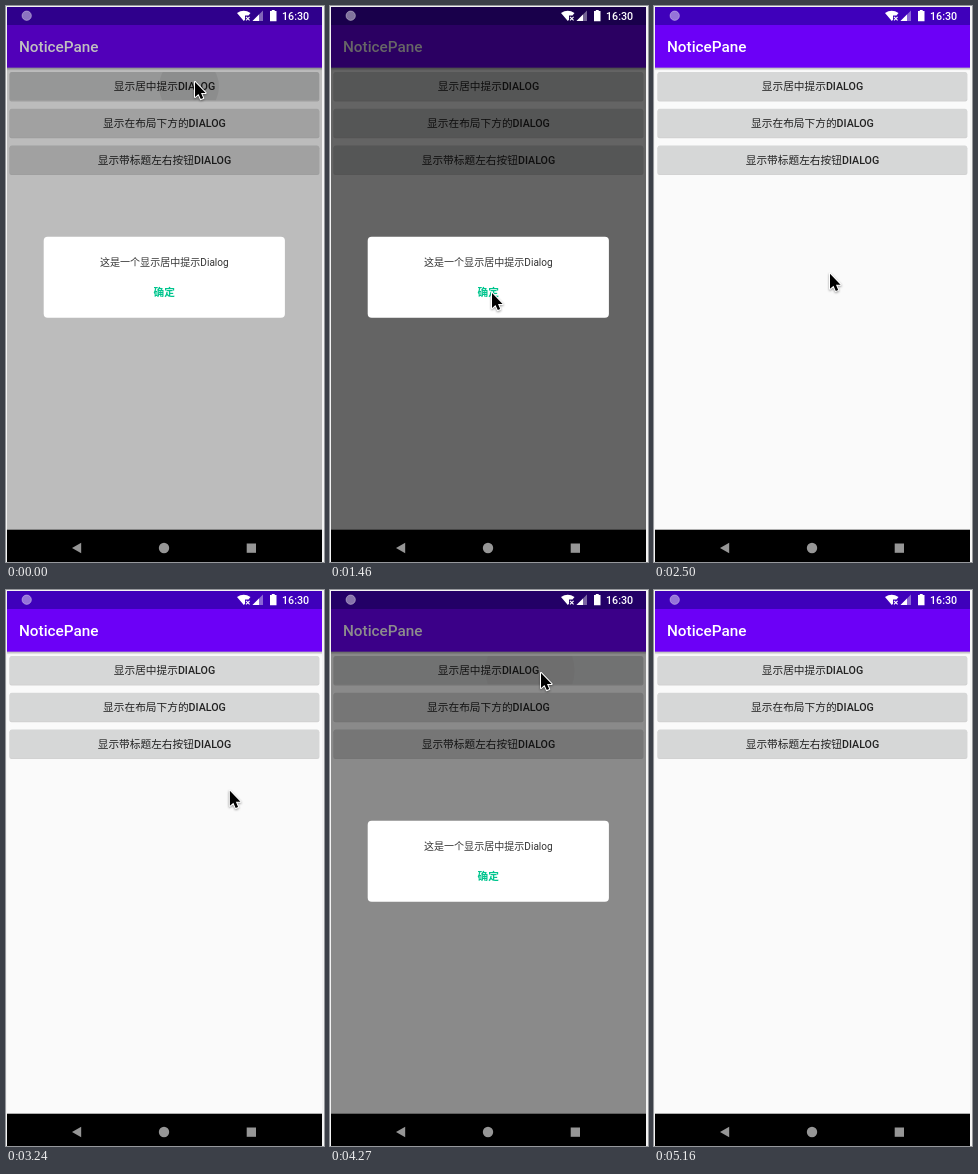
An HTML page for the animation above (5.46 s loop, 318x556 px).

```html
<!DOCTYPE html>
<html lang="zh-CN">
<head>
<meta charset="utf-8">
<title>Dialog demo</title>
<style>
  html, body { margin: 0; width: 100%; height: 100%; overflow: hidden; background: #f3f3f3; }
  svg { display: block; width: 100%; height: 100%; }
  text { font-family: Roboto, "Noto Sans CJK SC", "Noto Sans CJK", sans-serif; font-weight: 500; }
  .label { font-size: 10.7px; fill: #222; text-anchor: middle; }
  #cursor { filter: drop-shadow(0 1px 1px rgba(0, 0, 0, .4)); }
</style>
</head>
<body>
<svg viewBox="0 0 318 556">
  <defs>
    <linearGradient id="shade" x2="0" y2="1">
      <stop stop-opacity=".28"/>
      <stop offset="1" stop-opacity="0"/>
    </linearGradient>
    <clipPath id="face"><rect x="3.7" y="66" width="309.3" height="28.3" rx="2"/></clipPath>
  </defs>

  <rect x="1" y="1" width="315" height="555" fill="#fafafa"/>
  <rect x="1" y="1" width="315" height="18" fill="#3f00bb"/>
  <rect x="1" y="19" width="315" height="42.7" fill="#6c00f7"/>
  <rect x="1" y="61.7" width="315" height="3" fill="url(#shade)"/>
  <text x="13" y="46" font-size="15.3" fill="#fff">NoticePane</text>

  <g id="buttons"></g>
  <g id="ripple" clip-path="url(#face)">
    <rect x="3" y="66" width="311" height="29"/>
    <circle cy="80.5"/>
  </g>
  <rect id="dim" x="1" y="1" width="315" height="523"/>

  <g fill="#fff">
    <circle cx="20.7" cy="9.7" r="4.7" fill-opacity=".45" stroke="#fff" stroke-opacity=".35"/>
    <path d="M231 7Q237.7 2.5 244.5 7L242.5 9.6H239V13.8L237.8 15Z"/>
    <path d="M240 10.8l3.6 3.6m0-3.6l-3.6 3.6" stroke="#fff" stroke-width="1.1"/>
    <path d="M246.5 15L257 4.5V15Z" opacity=".4"/>
    <path d="M246.5 15L253 8.5V15Z"/>
    <path d="M264 5H265.8V4H268.7V5H270.5V15.3H264Z"/>
    <text x="276" y="13.8" font-size="10.7">16:30</text>
  </g>

  <rect x="1" y="523.7" width="315" height="33"/>
  <g fill="#969696">
    <path d="M66 542L75.2 536.8V547.2Z"/>
    <circle cx="158" cy="542" r="5.2"/>
    <rect x="240.7" y="537.5" width="9.3" height="9.3"/>
  </g>

  <g id="dialog">
    <rect x="37.7" y="230.8" width="241.2" height="81" rx="4" fill="#fff"/>
    <text class="label" x="158.3" y="259.7" style="font-size:10.05px;font-weight:400;fill:#333">这是一个显示居中提示Dialog</text>
    <text class="label" x="158.3" y="290" style="font-weight:700;fill:#00c58e">确定</text>
  </g>

  <path id="cursor" d="M0 0V14.9L3.5 11.9L5.8 17.1L8.2 16.1L6 11H10.6Z"
        stroke="#fff" stroke-width="2" stroke-linejoin="round" paint-order="stroke"/>
</svg>
<script>
const LOOP = 5460, STEP = 147.5, FIRST = 140;
const $ = id => document.getElementById(id);
const clamp = v => Math.min(1, Math.max(0, v));
const smooth = k => k * k * (3 - 2 * k);

// Each showing of the dialog; tapX is where its button was pressed.
const shows = [
  { open: -100, close: 2110, tapX: 183 },
  { open: 4090, close: 4695, tapX: 200 }];

// Pointer glides, each starting where the last one ended; bow bends the path sideways.
const glides = [
  { from: 290, to: 1180, x: 162, y: 287, bow: 44 },
  { from: 2300, to: 2950, x: 224, y: 202, bow: 0 },
  { from: 3200, to: 3850, x: 211, y: 83, bow: 0 },
  { from: 4270, to: 4710, x: 229, y: 132, bow: 0 },
  { from: 4710, to: 5100, x: 250, y: 610, bow: 0 }];

$('buttons').innerHTML =
  ['显示居中提示DIALOG', '显示在布局下方的DIALOG', '显示带标题左右按钮DIALOG'].map((label, i) => `
    <g transform="translate(0 ${66 + 36.8 * i})">
      <rect x="3.4" y=".6" width="310" height="28.8" rx="2" opacity=".16"/>
      <rect x="3.7" width="309.3" height="28.3" rx="2" fill="#d6d7d7"/>
    </g>
    <text class="label" x="158.5" y="${84 + 37 * i}">${label}</text>`).join('');

function drawDialog(t, { open, close }) {
  const left = 1 - clamp((t - close) / 225);
  const shown = clamp((t - open) / 100) * left ** 5;
  const scale = .9 + .1 * shown;
  $('dim').setAttribute('opacity', .6 * clamp((t - open) / 240) * left);
  $('dialog').setAttribute('opacity', shown);
  $('dialog').setAttribute('transform',
    `translate(158.3 271.3) scale(${scale}) translate(-158.3 -271.3)`);
}

function drawRipple(t, { open, tapX }) {
  const k = clamp((t - open + 65) / 330);
  const spot = $('ripple').querySelector('circle');
  $('ripple').setAttribute('fill-opacity', k ? .13 * (1 - k) : 0);
  spot.setAttribute('cx', tapX);
  spot.setAttribute('r', 60 * k);
}

function drawCursor(t) {
  let x = 189, y = 76;
  for (const g of glides) {
    const e = smooth(clamp((t - g.from) / (g.to - g.from)));
    x += (g.x - x) * e + g.bow * Math.sin(Math.PI * e);
    y += (g.y - y) * e;
  }
  $('cursor').setAttribute('transform', `translate(${x} ${y})`);
}

const start = performance.now();
function frame() {
  const now = (performance.now() - start) % LOOP;
  // The screen refreshes in even steps.
  const t = Math.max(0, FIRST + STEP * Math.floor((now - FIRST + 8) / STEP));
  const show = shows.findLast(s => t >= s.open - 65);
  drawDialog(t, show);
  drawRipple(t, show);
  drawCursor(t);
  requestAnimationFrame(frame);
}
frame();
</script>
</body>
</html>
```
